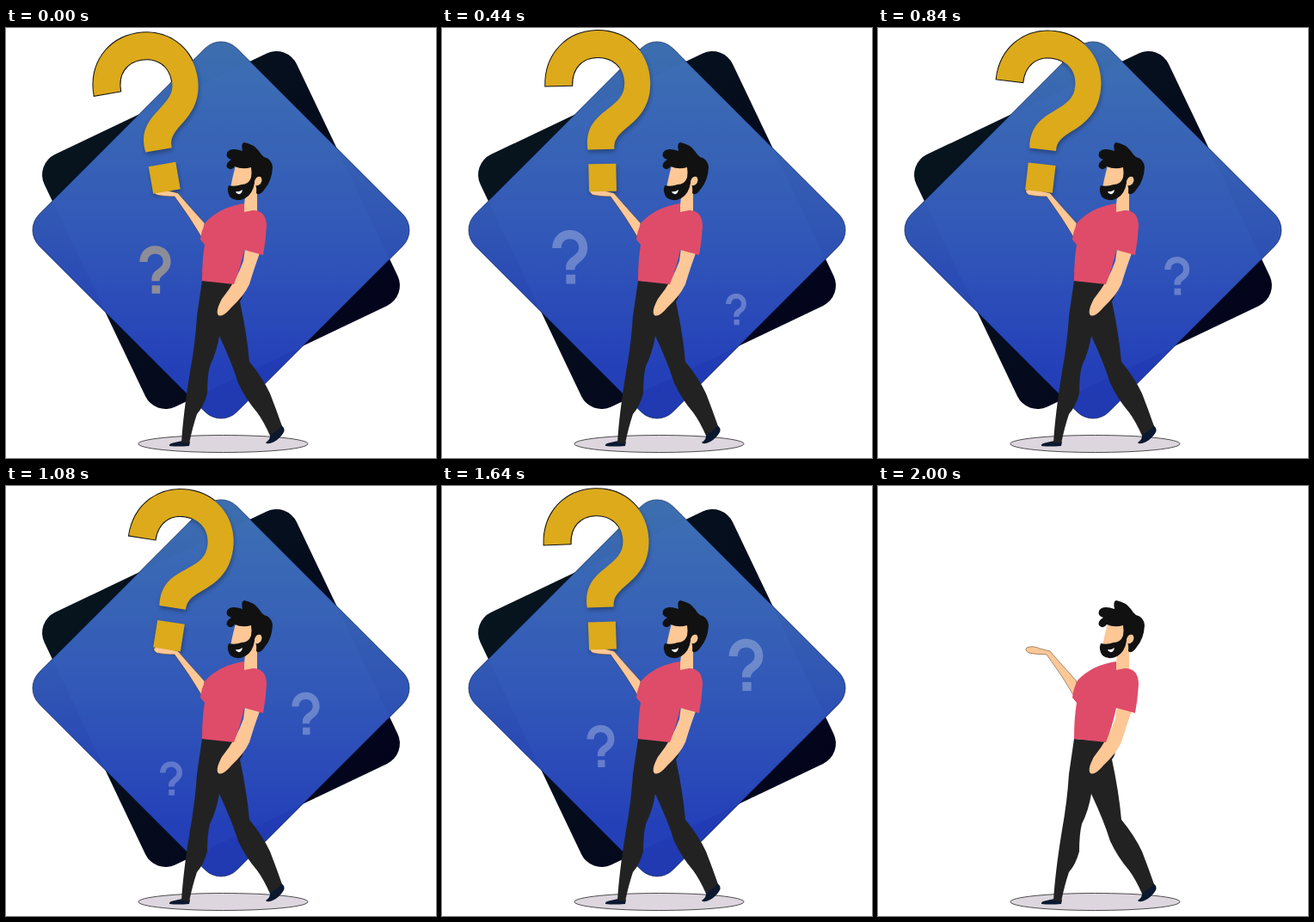
An HTML page for the animation above (2040 ms loop, 500 px wide and 500 px high).

```html
<!DOCTYPE html>
<html lang="en">
<head>
<meta charset="utf-8">
<title>Man holding a question mark</title>
<style>
  html, body { margin: 0; width: 100%; height: 100%; overflow: hidden; background: #fff; }
  svg { display: block; width: 100%; height: 100%; }
</style>
</head>
<body>
<svg viewBox="0 0 500 500">
  <defs>
    <linearGradient id="blue" gradientUnits="userSpaceOnUse" x1="88" y1="73" x2="412" y2="397">
      <stop offset="0" stop-color="#3d70af"/>
      <stop offset=".5" stop-color="#3055b4"/>
      <stop offset=".85" stop-color="#213bb5"/>
      <stop offset="1" stop-color="#2039b0"/>
    </linearGradient>
    <linearGradient id="night" gradientUnits="userSpaceOnUse" x1="163" y1="48" x2="338" y2="422">
      <stop offset="0" stop-color="#07151e"/>
      <stop offset="1" stop-color="#03041c"/>
    </linearGradient>
    <rect id="tile" x="87.5" y="72.5" width="325" height="325" rx="26"/>
    <path id="mark" d="M123 66C123 28 150 3 184 3C220 3 245 30 245 64C245 90 233 104 216 117C205 126 201 131 201.500 141H170.500C168 117 179 106 194 95C207 85 215 79 215 64C215 46 202 34 184 34C166 34 154 46 154 66ZM171 158H203V190H171Z"/>
    <clipPath id="inDiamond"><use href="#tile" transform="rotate(45 250 235)"/></clipPath>
    <filter id="blur"><feGaussianBlur stdDeviation="2.5"/></filter>
  </defs>

  <g id="back">
    <use class="sway" href="#mark" stroke="#111" stroke-width="2"/>
    <use href="#tile" transform="rotate(-25.500 250 235)" fill="url(#night)"/>
    <use href="#tile" transform="rotate(45 250 235)" fill="url(#blue)" stroke="#0b1c4c" stroke-width=".6"/>
    <g clip-path="url(#inDiamond)">
      <use href="#tile" transform="rotate(-25.500 250 235)" fill="#4a80e0" opacity=".08"/>
      <use class="small" href="#mark"/>
      <use class="small" href="#mark"/>
      <g transform="translate(1 3)" filter="url(#blur)" opacity=".3"><use class="sway" href="#mark"/></g>
    </g>
  </g>

  <ellipse cx="252.500" cy="483.500" rx="98.500" ry="10" fill="#ddd6de" stroke="#222" stroke-width=".8"/>

  <!-- shoes and trousers -->
  <path fill="#0a1930" d="M205 480L214 481L213 486Q200 487 190 486Q189 483 196 482ZM307 472L320 462Q325 465 323 470Q319 477 312 481Q304 485 302 482Q308 478 307 472Z"/>
  <path fill="#222" d="M228 294L269 297L275 306Q277 312 272 318Q280 355 283 388Q298 406 307 425Q314 443 321 463L307 474Q300 458 292 447Q279 432 270 413Q263 390 248 358Q245 377 237 393Q234 405 234 425Q230 440 222 449Q217 464 213 483L204 482Q206 449 214 400Q220 367 222 335Z"/>

  <!-- skin -->
  <g fill="#fdc796">
    <path stroke="#432" stroke-width=".5" d="M173 188Q180 185 188 189L200 192Q205 198 231 227L229 246Q214 220 196 196Q184 196 175 194Q170 190 173 188Z"/>
    <path d="M278 256L295 262Q289 278 283 298Q277 311 262 325Q252 337 247 334Q243 330 251 315Q268 294 276 271Z"/>
    <path d="M267 160L286 160L292 185L292 216H276L278 196L260 193Q262 178 267 160Z"/>
  </g>

  <path fill="#df4c69" d="M277 204Q249 208 232 226Q227 236 226 246L231 252Q228 270 228 294L265 298Q273 278 277 258L299 264Q302 248 303 231Q303 212 287 212L277 214Z"/>

  <!-- hair, beard, ear, mouth -->
  <path fill="#111" d="M277 133Q288 135 294 143Q297 148 300 150Q309 152 310 162Q309 178 301 187Q295 196 291 192Q292 184 289 180Q287 193 278 198Q268 203 261 197Q256 190 259 183Q266 185 274 182Q282 182 285 174Q286 167 285 162Q275 165 266 161Q262 167 257 162Q255 157 262 153Q255 151 257 145Q261 138 275 143Q273 134 277 133Z"/>
  <path fill="#fdc796" d="M289 178Q291 172 296 173Q299 176 296 181Q292 185 289 182Z"/>
  <path fill="#fff" d="M267 190Q271 191 275 188Q274 194 270 193Q267 192 267 190Z"/>

  <use id="front" class="sway" href="#mark" fill="#dcaa1b"/>
</svg>
<script>
const LOOP = 2040, STEP = 40;
const all = s => [...document.querySelectorAll(s)];
const back = document.getElementById('back');
const front = document.getElementById('front');
const sways = all('.sway'), smalls = all('.small');

// each floating mark: path points [time, x, y] and height as base + rate * time
const floats = [
  { base: 22, rate: .0164, path: [[880, 193, 353], [1080, 192, 340], [1400, 189, 319], [1640, 184.5, 302.5],
    [2040, 173.5, 281], [2280, 161.5, 269.5], [2680, 136, 263], [2800, 128, 261]] },
  { base: 27.5, rate: .0202, path: [[80, 333, 362], [240, 337, 346], [640, 347, 308], [1080, 348.5, 264.5],
    [1400, 348.5, 232], [1640, 353.5, 208], [1880, 358, 185]] }
];

function pointAt(path, t) {
  const i = Math.max(1, path.findIndex(p => p[0] >= t));
  const [a, b] = [path[i - 1], path[i]];
  const k = (t - a[0]) / (b[0] - a[0]);
  return [a[1] + (b[1] - a[1]) * k, a[2] + (b[2] - a[2]) * k];
}

function drawFloat(el, { base, rate, path }, time) {
  const start = path[0][0], end = path[path.length - 1][0];
  const t = time < start ? time + LOOP : time;
  const shown = t >= start && t <= end;
  el.style.display = shown ? '' : 'none';
  if (!shown) return;
  const [x, y] = pointAt(path, t);
  const scale = (base + rate * t) / 187;
  el.setAttribute('transform', `translate(${x} ${y}) scale(${scale}) translate(-184 -96.5)`);
  // the loop opens with a brief solid grey
  const grey = time < STEP;
  el.setAttribute('fill', grey ? '#8d8d98' : '#fff');
  el.setAttribute('opacity', grey ? 1 : .28 * Math.min(1, (t - start) / 220, (end - t) / 160));
}

function draw(now) {
  const time = Math.floor(now % LOOP / STEP) * STEP;
  const angle = 10.1 - 20 * Math.abs(time / (LOOP / 2) - 1);
  sways.forEach(el => el.setAttribute('transform', `rotate(${angle} 187 190)`));
  smalls.forEach((el, i) => drawFloat(el, floats[i], time));
  // only the man stays for the last step
  back.style.display = front.style.display = time >= 2000 ? 'none' : '';
}

const begin = performance.now();
function tick() {
  draw(performance.now() - begin);
  requestAnimationFrame(tick);
}
tick();
</script>
</body>
</html>
```
